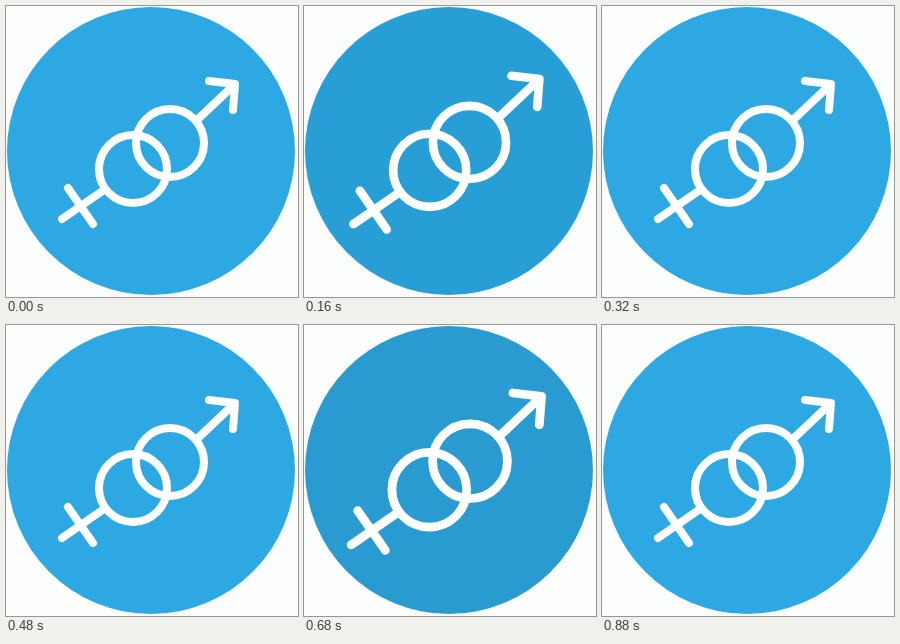
Animation of 292 by 291 pixels, one loop 2.88 s. Source, as an HTML page with a canvas:

```html
<!DOCTYPE html>
<html lang="en">
<head>
<meta charset="utf-8">
<title>Pulse</title>
<style>
  html, body { margin: 0; width: 100%; height: 100%; overflow: hidden; background: #fcfefd; }
  canvas { display: block; width: 292px; height: 291px; }
</style>
</head>
<body>
<canvas id="stage" width="292" height="291"></canvas>
<script>
const ctx = document.getElementById('stage').getContext('2d');
const LOOP = 2880, STEP = 40, PERIOD = 560, BEAT = 240, GAIN = 0.1;
const CX = 144, CY = 145;

// Two smooth beats, then a long rest.
function pulse(t) {
  const local = t < 2 * PERIOD ? t % PERIOD : BEAT;
  return local < BEAT ? Math.sin(Math.PI * local / BEAT) ** 2 : 0;
}

function disc(color) {
  ctx.fillStyle = color;
  ctx.beginPath();
  ctx.arc(145, 145, 144, 0, Math.PI * 2);
  ctx.fill();
}

function ring(x, y, r) {
  ctx.beginPath();
  ctx.arc(x, y, r, 0, Math.PI * 2);
  ctx.stroke();
}

function line(...pts) {
  ctx.beginPath();
  pts.forEach(([x, y]) => ctx.lineTo(x, y));
  ctx.stroke();
}

function symbol(scale) {
  ctx.save();
  ctx.translate(CX, CY);
  ctx.scale(scale, scale);
  ctx.translate(-CX, -CY);
  ctx.strokeStyle = '#fff';
  ctx.lineWidth = 8;
  ctx.lineCap = ctx.lineJoin = 'round';
  ring(127, 163, 34);
  ring(164, 137, 34);
  line([191, 114], [228, 79]);
  line([203, 75], [229, 78], [227, 104]);
  line([98, 184], [56, 213]);
  line([62, 182], [87, 218]);
  ctx.restore();
}

function draw(t) {
  const p = pulse(t);
  ctx.fillStyle = '#fcfefd';
  ctx.fillRect(0, 0, 292, 291);
  disc(p < 0.05 ? '#2ea8e3' : p > 0.9 ? '#2a9bd1' : '#289ed6');
  symbol(1 + GAIN * p);
}

const start = performance.now();
function tick() {
  const t = (performance.now() - start) % LOOP;
  draw(Math.floor(t / STEP) * STEP);
  requestAnimationFrame(tick);
}
tick();
</script>
</body>
</html>
```
